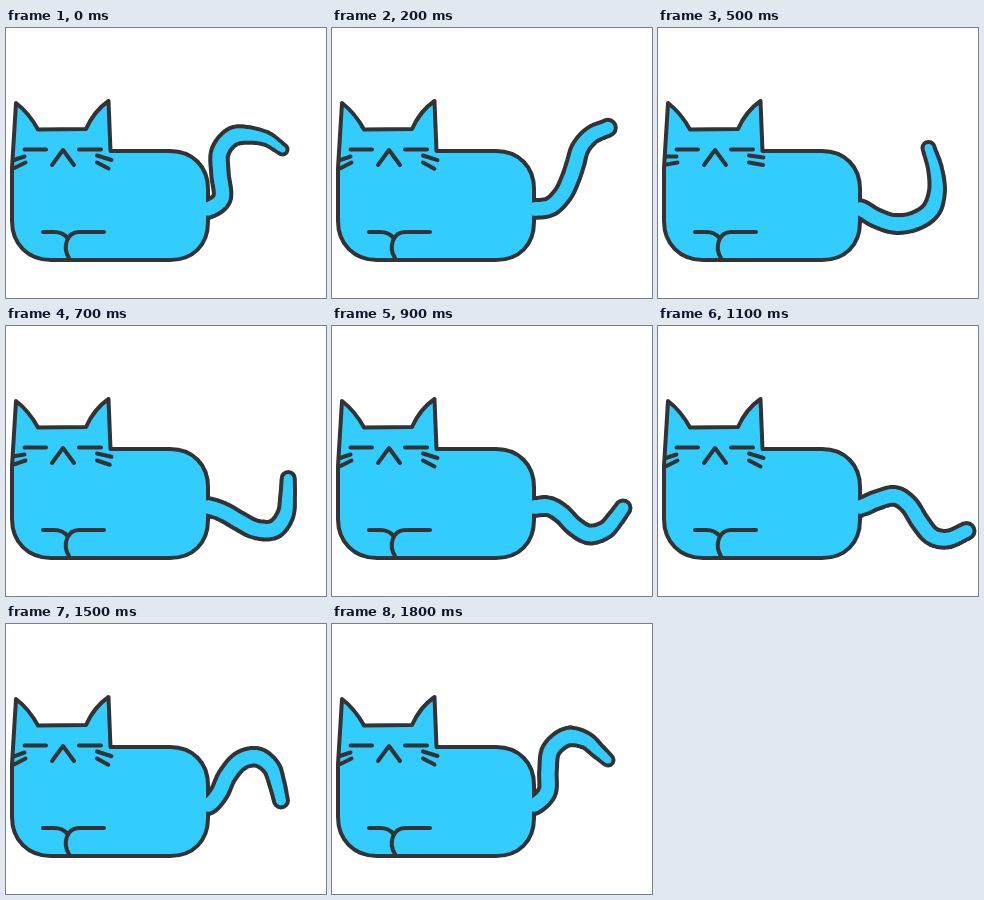
Animation, 320 px wide and 270 px high, one loop 1900 ms. Source, as an HTML page with a canvas:

```html
<!DOCTYPE html>
<html lang="en">
<head>
<meta charset="utf-8">
<title>Cat wagging its tail</title>
<style>
  html, body { margin: 0; width: 100%; height: 100%; overflow: hidden; background: #fff; }
  canvas { display: block; }
</style>
</head>
<body>
<canvas id="stage" width="320" height="270"></canvas>
<script>
const ctx = document.getElementById('stage').getContext('2d');
const LOOP = 1900, STEP = 100;
const BLUE = '#33ccff', INK = '#333333', LINE = 4;
const BASE = [202, 181], BASE_RADIUS = 8.8;

// Key poses: time, tip radius, whisker droop, tail spine from base to tip.
const poses = [
  { t: 0, tip: 5, droop: 1, spine: [[216,170],[214,146],[214,124],[226,109],[243,107],[261,111],[276.5,121.5]] },
  { t: 300, tip: 9, droop: 0.9, spine: [[218,183],[233,179],[244,168],[248,153],[248,137],[253,121],[262.5,106.5]] },
  { t: 500, tip: 6, droop: 0, spine: [[218,190],[237,196],[257,193],[273,182],[279,163],[277,141],[270.5,120]] },
  { t: 900, tip: 7.5, droop: 1, spine: [[217,180.5],[230,188],[242,200],[257,208.5],[273,204],[283,193],[291,182]] },
  { t: 1100, tip: 8, droop: 1, spine: [[219,174],[237,170],[251,179],[262,196],[274,210],[290,213],[308.5,205]] },
  { t: 1500, tip: 7, droop: 1.1, spine: [[213,169],[221,152],[234,137],[251,133],[265,143],[271,160],[275,176.5]] },
  { t: 1800, tip: 5.5, droop: 1, spine: [[215,168],[216,147],[219,126],[235,113],[253,116],[266,127],[276,136]] }
];

// Each pose becomes a flat vector: tip, droop, then heading and length per joint.
for (const pose of poses) {
  pose.values = [pose.tip, pose.droop];
  let from = BASE;
  for (const to of pose.spine) {
    const dx = to[0] - from[0], dy = to[1] - from[1];
    pose.values.push(Math.atan2(dy, dx), Math.hypot(dx, dy));
    from = to;
  }
}

function poseAt(index) {
  const n = poses.length, wraps = Math.floor(index / n);
  const pose = poses[index - wraps * n];
  return { t: pose.t + wraps * LOOP, values: pose.values };
}

// Cyclic cubic interpolation between unevenly spaced poses.
function blend(t) {
  let i = poses.length - 1;
  while (poses[i].t > t) i--;
  const [a, b, c, d] = [-1, 0, 1, 2].map(k => poseAt(i + k));
  const span = c.t - b.t, u = (t - b.t) / span;
  const slope = (p, q, r, k) => {
    const h0 = q.t - p.t, h1 = r.t - q.t;
    const s0 = (q.values[k] - p.values[k]) / h0;
    const s1 = (r.values[k] - q.values[k]) / h1;
    return s0 * s1 <= 0 ? 0 : (s0 * h1 + s1 * h0) / (h0 + h1);
  };
  return b.values.map((v, k) => {
    const w = c.values[k];
    const m0 = slope(a, b, c, k) * span, m1 = slope(b, c, d, k) * span;
    const u2 = u * u, u3 = u2 * u;
    return (2 * u3 - 3 * u2 + 1) * v + (u3 - 2 * u2 + u) * m0
         + (3 * u2 - 2 * u3) * w + (u3 - u2) * m1;
  });
}

function catmull(p, q, r, s, u) {
  return 0.5 * (2 * q + (r - p) * u + (2 * p - 5 * q + 4 * r - s) * u * u
    + (3 * q - p - 3 * r + s) * u * u * u);
}

function tailDiscs(values) {
  const tip = values[0], joints = [[BASE[0] - 14, BASE[1]], BASE];
  for (let k = 2; k < values.length; k += 2) {
    const [x, y] = joints[joints.length - 1];
    joints.push([x + Math.cos(values[k]) * values[k + 1], y + Math.sin(values[k]) * values[k + 1]]);
  }
  const [e, f] = joints.slice(-2);
  joints.push([2 * f[0] - e[0], 2 * f[1] - e[1]]);

  const discs = [], segments = joints.length - 3, perSegment = 24;
  for (let n = 0; n <= segments * perSegment; n++) {
    const s = Math.min(Math.floor(n / perSegment), segments - 1);
    const u = n / perSegment - s;
    const [p, q, r, z] = joints.slice(s, s + 4);
    const taper = Math.max(0, (n / (segments * perSegment) - 0.6) / 0.4);
    discs.push([
      catmull(p[0], q[0], r[0], z[0], u),
      catmull(p[1], q[1], r[1], z[1], u),
      BASE_RADIUS + (tip - BASE_RADIUS) * taper
    ]);
  }
  return discs;
}

function fillDiscs(discs, grow, color) {
  ctx.beginPath();
  for (const [x, y, r] of discs) {
    ctx.moveTo(x + r + grow, y);
    ctx.arc(x, y, r + grow, 0, Math.PI * 2);
  }
  ctx.fillStyle = color;
  ctx.fill();
}

const body = new Path2D(`M10 75 Q23 85 32 101.5 L80 101 Q88 83 102.5 73 L104.5 123
  H164 C187 123 202 139 202 161 V194 C202 217 187 232 164 232
  H45 C22 232 6 216 6 193 V140 Z`);
const details = new Path2D(`M18.5 121.5 H40 M73 121.5 H95 M46 137 L57 122 L68 137
  M37 204 H48 Q57 204 61.5 210
  M98 204 H73 C61 204 56 219 63 230`);

function drawWhiskers(droop) {
  const line = (x1, y1, x2, y2) => { ctx.moveTo(x1, y1); ctx.lineTo(x2, y2); };
  ctx.beginPath();
  line(91, 127.5, 105.5, 129.5 + 2.5 * droop);
  line(91, 134.5, 105 - 2.5 * droop, 137 + 3.5 * droop);
  line(18.5, 128.5, 8, 128.5 + 3.5 * droop);
  line(19.5, 134.5, 8.5, 136.5 + 3.5 * droop);
  ctx.stroke();
}

function draw(now) {
  const t = Math.floor((now % LOOP) / STEP) * STEP;
  const values = blend(t), tail = tailDiscs(values);

  ctx.fillStyle = '#fff';
  ctx.fillRect(0, 0, 320, 270);
  ctx.strokeStyle = INK;
  ctx.lineWidth = LINE;
  ctx.lineCap = ctx.lineJoin = 'round';

  // The blue tail core goes on last, opening the body outline at the base.
  fillDiscs(tail, LINE / 2, INK);
  ctx.fillStyle = BLUE;
  ctx.fill(body);
  ctx.stroke(body);
  fillDiscs(tail, -LINE / 2, BLUE);

  ctx.stroke(details);
  drawWhiskers(values[1]);
  requestAnimationFrame(draw);
}
requestAnimationFrame(draw);
</script>
</body>
</html>
```
